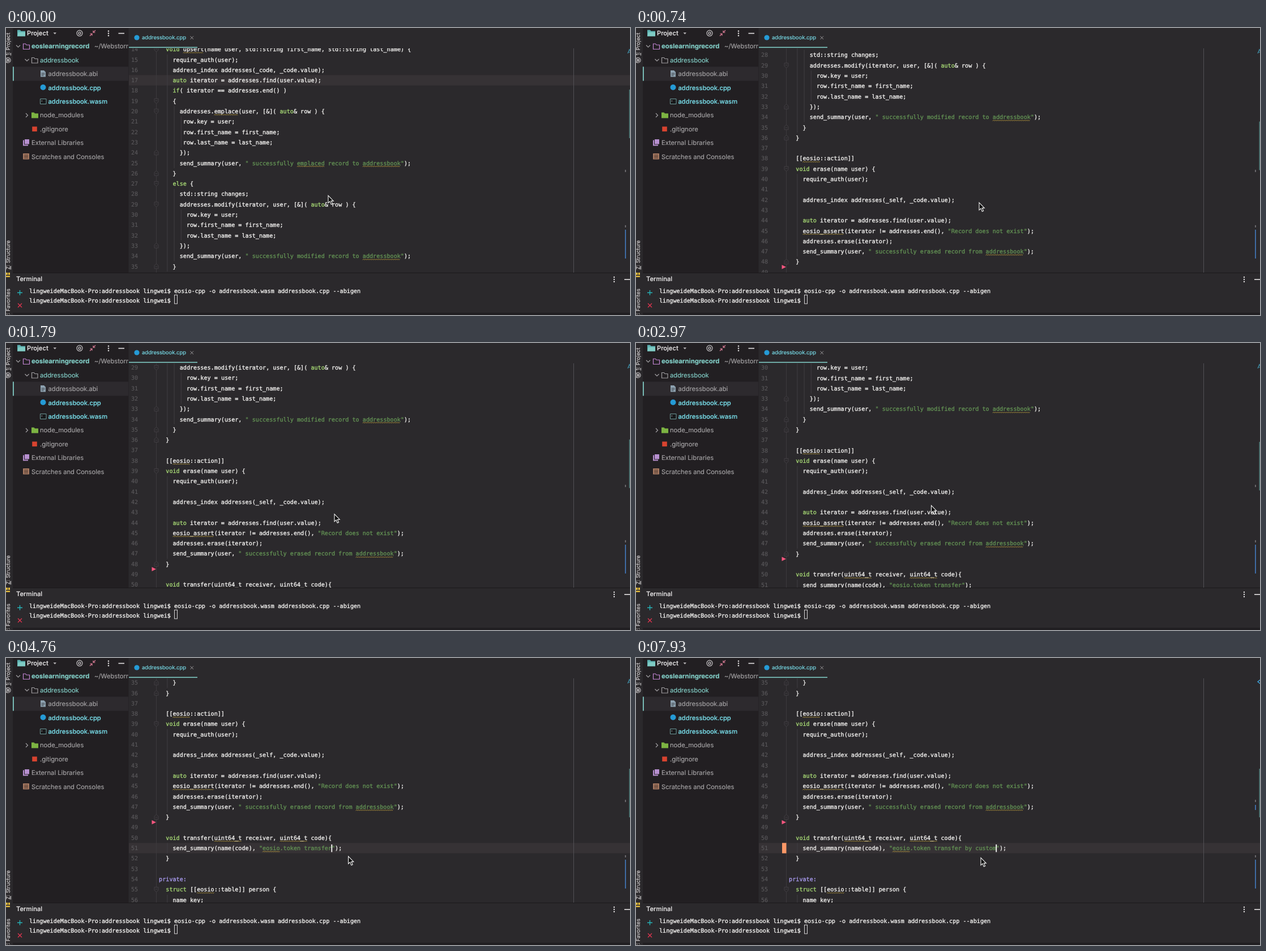
Animation of 1102 by 508 pixels, one loop 8000 ms. Source, as an HTML page:

```html
<!DOCTYPE html>
<html lang="en">
<head>
<meta charset="utf-8">
<title>Editor</title>
<style>
  html, body { margin: 0; width: 100%; height: 100%; overflow: hidden; background: #2b292c; }
  svg { display: block; width: 100%; height: 100%; }
  text, tspan { fill: currentColor; stroke: currentColor; stroke-width: .18px; white-space: pre; }
  text { text-rendering: geometricPrecision; }
  .mono { font: 10.13px "DejaVu Sans Mono", monospace; color: #f8f7f5; }
  .mono tspan, text.mono { stroke-width: .3px; }
  .mono .num { color: #5c5a5d; stroke-width: .1px; }
  .ui { font: 11.2px Inter, sans-serif; color: #a3a1a3; }
  .medium { font-weight: 500; }
  .small { font-size: 9.5px; }
  .side { font-size: 9.3px; color: #d6d4d5; }
  .light { color: #e4e2e3; }
  .cyan { color: #78dce8; }
  .teal { color: #80cbc4; }
  .root { font-weight: 700; font-size: 11.4px; }
  .kw { color: #a9dc76; }
  .acc { color: #ab9df2; }
  .str { color: #649455; }
  .line { fill: none; stroke: #c9c7c9; stroke-width: 1.2; }
  .wave { fill: none; stroke: #ab903c; stroke-width: .9; }
  .guide { stroke: #413e43; stroke-width: 1; }
  .fold { fill: #2b292c; stroke: #48454a; stroke-width: .8; }
</style>
</head>
<body>
<svg viewBox="0 0 1102 508" preserveAspectRatio="none">
  <defs>
    <clipPath id="pane"><rect x="217" y="36" width="885" height="398"/></clipPath>
    <clipPath id="tree"><rect x="12" y="0" width="204" height="434"/></clipPath>
  </defs>
  <rect width="1102" height="508" fill="#2b292c"/>

  <!-- editor -->
  <g clip-path="url(#pane)">
    <rect id="active" x="217" width="885" height="18.3" fill="#363235"/>
    <path d="M265.5 36V434" stroke="#3c393d"/>
    <path d="M1002.5 36V434" stroke="#515054"/>
    <g id="code" class="mono"></g>
    <rect id="caret" y="330" width="1.8" height="13.5" fill="#fcfcfa"/>
  </g>
  <rect x="1093" y="251" width="2" height="4" fill="#69676b"/>
  <rect x="1093" y="349" width="2" height="4" fill="#69676b"/>
  <rect x="1093" y="357" width="2" height="51" fill="#3f6ca4"/>
  <rect id="edit" x="1093" y="260" width="2" height="9" fill="#3f6ca4"/>
  <rect id="thumb" x="1100.5" width="1.5" height="86" fill="#4f7b78"/>
  <path id="idle" d="M1098 45l3-7 2 4M1099 43h3" fill="none" stroke="#3f8fa8" stroke-width="1.2"/>
  <path id="busy" d="M1103 38l-5 4 5 4" fill="none" stroke="#3fa3dc" stroke-width="1.4"/>

  <!-- tab -->
  <circle cx="231" cy="17" r="4.6" fill="#259bd6"/>
  <text class="ui small cyan" x="240" y="20.4">addressbook.cpp</text>
  <path d="M325.5 14.5l5.5 5.5m0-5.5l-5.5 5.500" class="line" style="stroke: #9a989a; stroke-width: 1"/>
  <rect x="217" y="33.5" width="121" height="1.6" fill="#80cbc4"/>

  <!-- project tree -->
  <rect x="12" width="204.5" height="434" fill="#221f22"/>
  <g clip-path="url(#tree)">
    <rect x="12" y="68.5" width="205" height="25" fill="#2d2a2e"/>
    <rect x="12" y="68.5" width="1.8" height="25" fill="#80cbc4"/>
    <path d="M20 3.500h5l1.500 2H34v9H20z" fill="#5fb3b3"/>
    <path d="M22 7.500h12v7H20z" fill="#80cbc4"/>
    <text class="ui light medium" x="37" y="12.500">Project</text>
    <path d="M83.500 8h5.500l-2.700 3.200z" fill="#b5b3b5"/>
    <g class="line">
      <circle cx="130" cy="9.200" r="5"/><circle cx="130" cy="9.200" r="2"/>
      <path d="M158 4l-4 4m0-3.500V8h3.500M148 14l4-4m0 3.500V10h-3.500" stroke="#d77a94"/>
      <path d="M18 30.500l3.500 3.500L25 30.500M33.500 55l3.500 3.500 3.500-3.500M35 151l3.500 3.500-3.500 3.500" stroke="#a09ea1"/>
      <path d="M30.500 28h4l1.500 2h5.500v7.500h-11z" stroke="#c486d3"/>
      <path d="M45.500 52.500h4l1.500 2h5v7.500h-10.500z" stroke="#a09ea1"/>
      <path d="M60.500 125.500h10.500v9h-10.500z" stroke="#6f9a9a" stroke-width="1" fill="#17181a"/>
      <path d="M62.500 128l1.500 1.200-1.500 1.200" stroke-width=".7"/>
    </g>
    <g fill="#e4e2e3">
      <circle cx="181" cy="5.500" r="1.200"/><circle cx="181" cy="9.500" r="1.200"/><circle cx="181" cy="13.500" r="1.200"/>
      <rect x="198.500" y="8.700" width="10.500" height="1.600"/>
    </g>
    <path d="M61 75h6l3 3v8.500h-9z" fill="#8ea2b0"/>
    <path d="M62.500 80h6m-6 2h6m-6 2h4" stroke="#3a4046" stroke-width=".9"/>
    <circle cx="65.500" cy="105" r="5" fill="#259bd6"/>
    <path d="M45 149.500h4.500l1.500 1.800h6v8.200H45z" fill="#7cb342"/>
    <rect x="46.200" y="174.500" width="8.600" height="8.600" fill="#d8432f"/>
    <path d="M30 198.500h2v8h7v2h-9zM33 197h8v8.500h-8z" fill="#b78fd0"/>
    <path d="M30 222h11v10.500H30z" fill="#a87a62"/>
    <path d="M32 225h7m-7 2.500h7m-7 2.500h7" stroke="#3a2a24"/>
    <g transform="translate(0 -.6)">
      <text class="ui teal root" x="45" y="37">eoslearningrecord</text>
      <text class="ui" x="156" y="37">~/WebstormProjects</text>
      <text class="ui teal" x="60" y="61.400">addressbook</text>
      <text class="ui" x="74.500" y="85.800">addressbook.abi</text>
      <text class="ui cyan medium" x="74.500" y="110.200">addressbook.cpp</text>
      <text class="ui cyan medium" x="74.500" y="134.600">addressbook.wasm</text>
      <text class="ui" x="60" y="159">node_modules</text>
      <text class="ui" x="60" y="183.400">.gitignore</text>
      <text class="ui" x="45" y="207.800">External Libraries</text>
      <text class="ui" x="45" y="232.200">Scratches and Consoles</text>
    </g>
  </g>

  <!-- tool strip -->
  <text class="ui side" transform="translate(7 48.500) rotate(-90)"><tspan text-decoration="underline">1</tspan>: Project</text>
  <g class="line"><circle cx="3.500" cy="57" r="4.500"/><circle cx="3.500" cy="57" r="2"/><path d="M.5 54l6 6m0-6l-6 6" stroke-width=".8"/></g>
  <text class="ui side" transform="translate(7 427.500) rotate(-90)"><tspan text-decoration="underline">Z</tspan>: Structure</text>
  <path d="M0 438.500h7v2.500H0zM0 433h3v4H0zM4 433h3v4H4z" fill="#e0b93c"/>
  <text class="ui side" transform="translate(7 512.500) rotate(-90)">2: Favorites</text>

  <!-- terminal -->
  <path d="M12 433.500H1102" stroke="#1b191b"/>
  <rect x="12" y="504" width="1090" height="4" fill="#211f22"/>
  <text class="ui light medium" x="18" y="448.400">Terminal</text>
  <g fill="#e4e2e3">
    <circle cx="1074" cy="441" r="1.200"/><circle cx="1074" cy="445" r="1.200"/><circle cx="1074" cy="449" r="1.200"/>
    <rect x="1092" y="444.400" width="10" height="1.600"/>
  </g>
  <path d="M20 468.500h9M24.500 464v9" stroke="#26b8bd" stroke-width="1.300"/>
  <path d="M21 487.500l7 7m0-7l-7 7" stroke="#e0354f" stroke-width="1.300"/>
  <text class="mono" x="41" y="469">lingweideMacBook-Pro:addressbook lingwei$ eosio-cpp -o addressbook.wasm addressbook.cpp --abigen</text>
  <text class="mono" x="41" y="485.600">lingweideMacBook-Pro:addressbook lingwei$ </text>
  <rect x="297.500" y="472.500" width="5" height="15.500" fill="none" stroke="#d6d4d5"/>

  <path id="pointer" d="M0 0V13.200L3 10.400 5.300 15.700 7.600 14.700 5.300 9.600H9.300Z" fill="#0c0c0c" stroke="#f4f4f4" stroke-width="1.100"/>
</svg>

<script>
const $ = id => document.getElementById(id);
const PITCH = 18.3, CHAR = 6.098, LEFT = 270.1, FIRST = 14, LOOP = 8000;
const EDIT_LINE = 51, CLICK = 3860, TOP = -.6;

const source = `
  void upsert(name user, std::string first_name, std::string last_name) {
    require_auth(user);
    address_index addresses(_code, _code.value);
    auto iterator = addresses.find(user.value);
    if( iterator == addresses.end() )
    {
      addresses.emplace(user, [&]( auto& row ) {
       row.key = user;
       row.first_name = first_name;
       row.last_name = last_name;
      });
      send_summary(user, " successfully emplaced record to addressbook");
    }
    else {
      std::string changes;
      addresses.modify(iterator, user, [&]( auto& row ) {
        row.key = user;
        row.first_name = first_name;
        row.last_name = last_name;
      });
      send_summary(user, " successfully modified record to addressbook");
    }
  }

  [[eosio::action]]
  void erase(name user) {
    require_auth(user);

    address_index addresses(_self, _code.value);

    auto iterator = addresses.find(user.value);
    eosio_assert(iterator != addresses.end(), "Record does not exist");
    addresses.erase(iterator);
    send_summary(user, " successfully erased record from addressbook");
  }

  void transfer(uint64_t receiver, uint64_t code){
    send_summary(name(code), "eosio.token transfer");
  }

private:
  struct [[eosio::table]] person {
    name key;`.split('\n').slice(1);

const typed = ' by custom';
const keyTimes = [5500, 5830, 5980, 6130, 6430, 6580, 6730, 7030, 7630, 7930];
const ticks = [0, 150, 300, 440, 590, 740, 1190,
  1490, 1640, 1780, 1930, 2080, 2230, 2380, 2520,
  2820, 2970, 3120, 3270, 3420, 3570, 3710, 3860,
  4010, 4160, 4310, 4460, 4610, 4760, 4910, 7180, ...keyTimes].sort((a, b) => a - b);

// time, scroll, pointer x, pointer y
const poses = [
  [0, 218, 569, 296.5], [300, 298, 597, 304.5], [740, 464, 606, 309], [1190, 477.7, 609, 310.5],
  [2970, 504.7, 521.5, 287.5], [3570, 596.2, 550, 302.5], [3860, 596.2, 578, 336], [4910, 596.2, 609, 353.5]
];

function make(parent, tag, attrs, content = '') {
  const el = document.createElementNS('http://www.w3.org/2000/svg', tag);
  for (const k in attrs) el.setAttribute(k, attrs[k]);
  el.textContent = content;
  return parent.appendChild(el);
}

const rowY = n => n * PITCH + TOP;
const colX = c => LEFT + c * CHAR;

function wave(x, y, width) {
  let d = `M${x} ${y + 1}`;
  for (let i = 1; i * 1.6 <= width; i++) d += `L${x + i * 1.6} ${y + (i % 2 ? -.8 : 1)}`;
  return d;
}

function drawLine(group, n, line) {
  group.textContent = '';
  const y = rowY(n), indent = line.search(/\S/);
  if (indent < 0) return;
  const text = make(group, 'text', { x: colX(indent), y: y + 3.6 });
  for (const part of line.trim().match(/"[^"]*"|\b(?:void|auto|if|else|struct)\b|private:|\w+|[^\w"]+/g)) {
    const kind = part[0] === '"' ? 'str' : part === 'private:' ? 'acc'
      : /^(void|auto|if|else|struct)$/.test(part) ? 'kw' : '';
    make(text, 'tspan', { class: kind }, part);
  }
  for (const m of line.matchAll(/\b(upsert|emplaced?|addressbook|eosio_assert|eosio|uint64_t)\b/g))
    make(group, 'path', { class: 'wave', d: wave(colX(m.index), y + 6, m[0].length * CHAR) });
}

const code = $('code');
function guide(col, from, to) {
  const x = colX(col) + 2.6;
  make(code, 'path', { class: 'guide', d: `M${x} ${rowY(from - .5)}V${rowY(to + .5)}` });
}
[[2, 15, 35], [4, 20, 25], [4, 28, 34], [6, 21, 23], [6, 30, 32], [2, 40, 47], [2, 51, 51], [2, 56, 56]]
  .forEach(g => guide(...g));

function fold(n, dir) {
  make(code, 'path', {
    class: 'fold', transform: `translate(265.5 ${rowY(n)}) scale(1 ${dir})`,
    d: 'M-3.5-4H3.5V1.500L0 4.500-3.500 1.500ZM-1.800-.5H1.800'
  });
}
[14, 19, 20, 27, 29, 39, 55].forEach(n => fold(n, 1));
[24, 26, 33, 35, 36, 48].forEach(n => fold(n, -1));

make(code, 'path', { d: `M257.500 ${rowY(48.5) - 3.800}l7.500 3.800-7.500 3.800z`, fill: '#f4567f' });
const bar = make(code, 'rect', { x: 258, y: rowY(EDIT_LINE - .5), width: 7.5, height: PITCH, fill: '#fc9867' });

let editGroup;
source.forEach((line, i) => {
  const n = FIRST + i;
  make(code, 'text', { class: 'num', x: 221, y: rowY(n) + 3.6 }, n);
  const group = make(code, 'g', {});
  drawLine(group, n, line);
  if (n === EDIT_LINE) editGroup = group;
});
const editText = source[EDIT_LINE - FIRST], quote = editText.lastIndexOf('"');

function poseAt(t) {
  const i = poses.findIndex(p => p[0] > t);
  if (i < 0) return poses[poses.length - 1];
  const a = poses[i - 1], b = poses[i], f = (t - a[0]) / (b[0] - a[0]);
  return a.map((v, k) => v + (b[k] - v) * f);
}

const show = (el, on) => el.setAttribute('visibility', on ? 'visible' : 'hidden');

function draw(t) {
  const [, scroll, px, py] = poseAt(t);
  const clicked = t >= CLICK, count = keyTimes.filter(k => k <= t).length;
  code.setAttribute('transform', `translate(0 ${-scroll})`);
  $('active').setAttribute('y', rowY((clicked ? EDIT_LINE : 17) - .5) - scroll);
  $('thumb').setAttribute('y', 109 + (scroll - 218) * .23);
  $('pointer').setAttribute('transform', `translate(${px} ${py})`);

  drawLine(editGroup, EDIT_LINE, editText.slice(0, quote) + typed.slice(0, count) + editText.slice(quote));
  $('caret').setAttribute('x', colX(quote + count) - .6);
  const lit = count ? t !== 7180 : Math.floor((t - CLICK) / 450) % 2 === 0;
  show($('caret'), clicked && lit);
  for (const el of [bar, $('edit'), $('busy')]) show(el, count > 0);
  show($('idle'), count === 0);
}

const start = performance.now();
let last = -1;
function frame() {
  const t = (performance.now() - start) % LOOP;
  const held = ticks.filter(k => k <= t).pop() || 0;
  if (held !== last) draw(last = held);
  requestAnimationFrame(frame);
}
frame();
</script>
</body>
</html>
```
